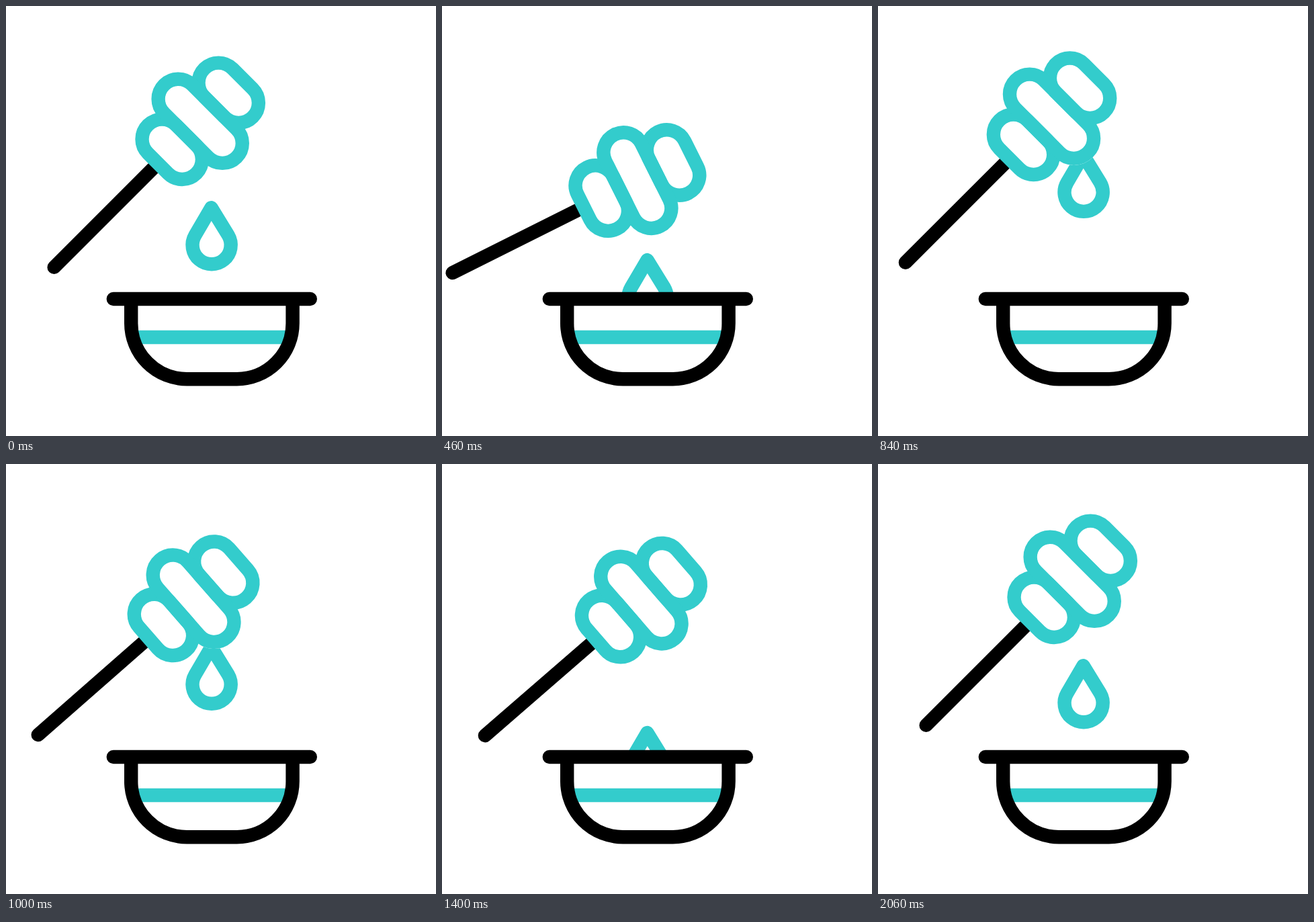
These frames come from a looping animation (640 by 640 pixels, 2.4 s). An HTML page:

```html
<!DOCTYPE html>
<html lang="en">
<head>
<meta charset="utf-8">
<title>Honey dipper</title>
<style>
  html, body { margin: 0; width: 100%; height: 100%; overflow: hidden; background: #fff; }
  svg { display: block; width: 100%; height: 100%; fill: none; stroke-width: 20.4; stroke-linejoin: round; }
  .honey { stroke: #3cc; }
  .ink { stroke: #000; stroke-linecap: round; }
  .mask { stroke: #fff; fill: #fff; }
</style>
</head>
<body>
<svg viewBox="0 0 640 640">
  <defs>
    <clipPath id="aboveRim"><rect width="640" height="436"/></clipPath>
    <path id="drop" d="M305.5 300.2L281.5 341.1A28.6 28.6 0 1 0 330.7 341.1Z"/>
    <g id="head">
      <rect x="-89.1" y="-50.9" width="59.4" height="101.8" rx="29.7"/>
      <rect x="29.7" y="-50.9" width="59.4" height="101.8" rx="29.7"/>
      <rect x="-29.7" y="-76.2" width="59.4" height="152.4" rx="29.7"/>
    </g>
  </defs>

  <g class="honey" clip-path="url(#aboveRim)">
    <use class="drop" href="#drop"/>
    <use class="drop" href="#drop"/>
    <use class="drop" href="#drop"/>
  </g>

  <g id="dipper">
    <use class="mask" href="#head"/>
    <path class="ink" d="M-307.7 0H-100"/>
    <use class="mask" href="#head" stroke-width="0" style="stroke:none"/>
    <use class="honey" href="#head"/>
  </g>

  <path class="honey" d="M191 493H422"/>
  <path class="ink" d="M186.2 436V472A83 83 0 0 0 269.2 555.2H343.6A83 83 0 0 0 426.6 472V436M159.8 436H452.8"/>
</svg>
<script>
const LOOP = 2400, STEP = 20;

// Dipper centre: [ms, x, y]
const stops = [
  [0, 289.2, 171.3],
  [440, 291.5, 260],
  [830, 258.4, 164.4],
  [1170, 300.4, 236],
  [1620, 289.2, 171.3]
];

// Dipper turn: [ms, degrees]
const turns = [[0, 0], [440, 18.6], [830, 0], [1185, 8], [1620, 0]];

// Each drop eases from one height to another while it is shown
const falls = [
  { start: 0, end: 897, from: 0, to: 150, show: 0 },
  { start: 419, end: 1744, from: -150, to: 150, show: 600 },
  { start: 1425, end: 2060, from: -150, to: 0, show: 1425, stay: true }
];

const ease = (t, a, b) => {
  const p = Math.min(1, Math.max(0, (t - a) / (b - a)));
  return p * p * (3 - 2 * p);
};

const segment = (keys, t) => {
  const i = keys.findIndex((k, n) => n && t < k[0]);
  return (i < 0 ? keys.length : i) - 1 - (i < 0 ? 1 : 0);
};

// Smooth path through the stops; the handles are a sixth of the neighbours' span
const handle = i => {
  const a = stops[i - 1], b = stops[i + 1];
  return a && b ? [(b[1] - a[1]) / 6, (b[2] - a[2]) / 6] : [0, 0];
};

const curves = stops.slice(1).map((b, i) => {
  const a = stops[i], h = handle(i), g = handle(i + 1);
  const path = document.createElementNS("http://www.w3.org/2000/svg", "path");
  path.setAttribute("d", `M${a[1]} ${a[2]}C${a[1] + h[0]} ${a[2] + h[1]} ${b[1] - g[0]} ${b[2] - g[1]} ${b[1]} ${b[2]}`);
  return { path, length: path.getTotalLength() };
});

const dipper = document.getElementById("dipper");
const drops = document.querySelectorAll(".drop");

function draw(t) {
  const i = segment(stops, t);
  const along = ease(t, stops[i][0], stops[i + 1][0]);
  const at = curves[i].path.getPointAtLength(curves[i].length * along);

  const j = segment(turns, t);
  const [a, b] = [turns[j], turns[j + 1]];
  const turn = a[1] + (b[1] - a[1]) * ease(t, a[0], b[0]);
  dipper.setAttribute("transform", `translate(${at.x} ${at.y}) rotate(${turn - 45})`);

  falls.forEach((f, n) => {
    const y = f.from + (f.to - f.from) * ease(t, f.start, f.end);
    const shown = t >= f.show && (f.stay || t < f.end);
    drops[n].setAttribute("transform", `translate(0 ${y})`);
    drops[n].setAttribute("visibility", shown ? "visible" : "hidden");
  });
}

const began = performance.now();

function tick() {
  const t = (performance.now() - began) % LOOP;
  draw(Math.floor(t / STEP) * STEP);
  requestAnimationFrame(tick);
}

draw(0);
requestAnimationFrame(tick);
</script>
</body>
</html>
```
